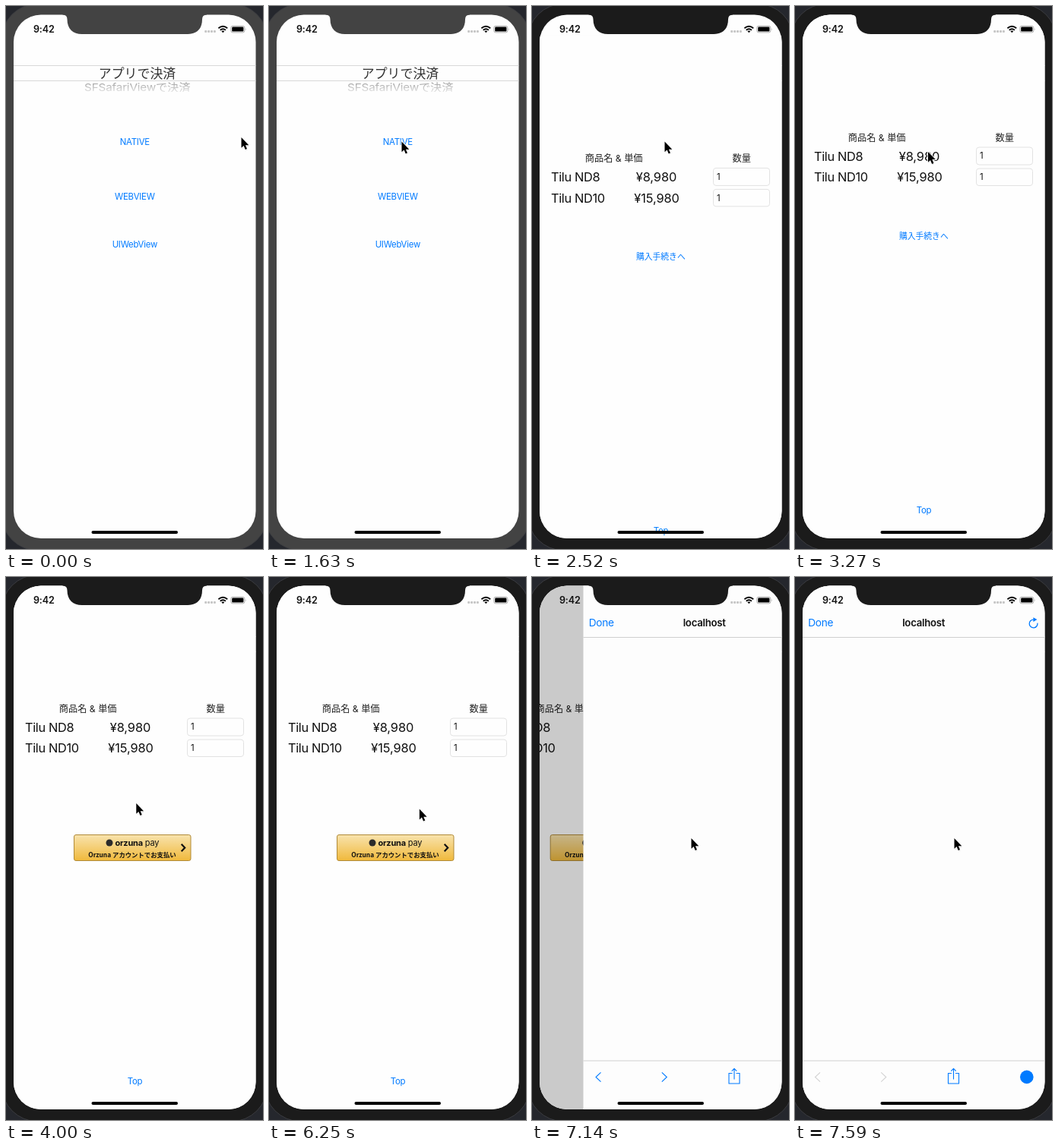
Write an HTML page that moves like this. It is 338 px wide and 715 px high and loops after 8000 ms.

```html
<!DOCTYPE html>
<html lang="ja">
<head>
<meta charset="utf-8">
<title>Checkout demo</title>
<style>
  html, body { margin: 0; width: 100%; height: 100%; overflow: hidden; background: #25272d; }
  svg { display: block; width: 338px; height: 715px; }
  text { font-family: Inter, "Noto Sans CJK JP", sans-serif; fill: #111; }
  .blue { fill: #007aff; }
  .mid { text-anchor: middle; }
  .link { font-size: 11.4px; letter-spacing: -.25px; }
  .head { font-size: 12.2px; fill: #222; }
  .item { font-size: 16.4px; letter-spacing: -.35px; }
  .price { font-size: 16.4px; letter-spacing: -.1px; }
  .line { fill: none; stroke: #007aff; stroke-width: 1.1; }
  .field { fill: #fefefe; stroke: #e2e2e2; stroke-width: 1; }
  .plain { font-family: "Noto Sans CJK JP", sans-serif; font-weight: 700; }
</style>
</head>
<body>
<svg viewBox="0 0 338 715" xmlns="http://www.w3.org/2000/svg">
  <defs>
    <clipPath id="screen"><rect x="10" y="11.5" width="318.5" height="689.5" rx="36"/></clipPath>
    <linearGradient id="gold" x2="0" y2="1">
      <stop offset="0" stop-color="#f8e3ad"/>
      <stop offset="1" stop-color="#f0b93c"/>
    </linearGradient>
    <linearGradient id="fade" x2="0" y2="1">
      <stop offset="0" stop-color="#fefefe" stop-opacity="0"/>
      <stop offset="1" stop-color="#fefefe" stop-opacity=".7"/>
    </linearGradient>
  </defs>

  <rect width="338" height="715" fill="#25272d"/>
  <rect id="body" x="-6" y="-3" width="350" height="720" rx="48" stroke="#3b3c40"/>

  <g clip-path="url(#screen)">
    <rect x="10" y="11" width="319" height="691" fill="#fefefe"/>

    <g id="menu">
      <text class="mid" x="172.5" y="94.8" font-size="16.9" style="fill:#333">アプリで決済</text>
      <text class="mid" transform="translate(172.7 112) scale(1 .88)" font-size="15.3" letter-spacing="-.2" style="fill:#a6a6a6">SFSafariViewで決済</text>
      <rect x="90" y="102" width="165" height="11" fill="url(#fade)"/>
      <rect x="90" y="113" width="165" height="8" fill="#fefefe"/>
      <path d="M10 78.5H329M10 98.5H329" stroke="#d8d8d8"/>
      <text class="mid blue link" x="169.3" y="182.9">NATIVE</text>
      <text class="mid blue link" x="169.3" y="254.6">WEBVIEW</text>
      <text class="mid blue link" x="169.3" y="318.4">UIWebView</text>
    </g>

    <g id="cart">
      <rect x="10" y="11" width="319" height="691" fill="#fefefe"/>
      <text class="mid head" x="107.7" y="177.6">商品名 &amp; 単価</text>
      <text class="mid head" x="275.7" y="177.6">数量</text>
      <text class="item" x="25" y="203.7">Tilu ND8</text>
      <text class="mid price" x="163.5" y="203.7">¥8,980</text>
      <rect class="field" x="238.5" y="186" width="74" height="23" rx="3.5"/>
      <text x="243" y="201.4" font-size="11.4">1</text>
      <text class="item" x="25" y="231.3">Tilu ND10</text>
      <text class="mid price" x="164" y="231.3">¥15,980</text>
      <rect class="field" x="238.5" y="214" width="74" height="22.5" rx="3.5"/>
      <text x="243" y="229.4" font-size="11.4">1</text>
      <text id="proceed" class="mid blue" x="169.3" y="306.6" font-size="10.8">購入手続きへ</text>
      <g id="pay">
        <rect x="89.5" y="339.5" width="153.5" height="34" rx="2.5" fill="url(#gold)" stroke="#b08a38"/>
        <circle cx="136" cy="350" r="4.5" fill="#2b2b2b"/>
        <text x="143.5" y="353.6" font-size="11" letter-spacing="-.2"><tspan font-weight="700">orzuna</tspan> pay</text>
        <text class="plain mid" x="166" y="369.4" font-size="8.4">Orzuna アカウントでお支払い</text>
        <path d="M230.7 351.8L235.2 356.5L230.7 361.2" fill="none" stroke="#111" stroke-width="2.2"/>
      </g>
      <text class="mid blue link" x="169.5" y="667.5">Top</text>
    </g>

    <rect id="dim" x="10" y="11" width="319" height="691"/>

    <g id="web">
      <rect x="10" y="11" width="319" height="691" fill="#fdfdfd"/>
      <path d="M10 79.5H329M10 637H329" stroke="#cfcfcf"/>
      <text class="blue" x="17.3" y="65.1" font-size="13.7" letter-spacing="-.3">Done</text>
      <text class="mid" x="169.2" y="64.8" font-size="13.2" font-weight="600" letter-spacing="-.25">localhost</text>
      <path class="line" style="stroke-width:1.3" d="M318.9 60.6A5.4 5.4 0 1 1 313.6 56.1"/>
      <path class="blue" d="M313.4 53.2L318.4 56.1L313.4 59Z"/>
      <path id="arrows" class="line" d="M33 652.3L26.5 658.5L33 664.7M113.3 652.3L119.8 658.5L113.3 664.7"/>
      <path class="line" d="M206 653.5H201.5V667H215.5V653.5H211M208.5 661.5V647.5M205.2 650.7L208.5 647.4L211.8 650.7"/>
      <circle class="blue" cx="304.8" cy="658.4" r="8.8"/>
    </g>

    <text class="mid" x="49.8" y="35.2" font-size="12.6" font-weight="600" letter-spacing="-.15">9:42</text>
    <g fill="#c6c6c6">
      <rect x="261.2" y="32" width="3" height="3" rx="1"/>
      <rect x="265.1" y="32" width="3" height="3" rx="1"/>
      <rect x="269" y="32" width="3" height="3" rx="1"/>
      <rect x="272.9" y="32" width="3" height="3" rx="1"/>
    </g>
    <g fill="none" stroke="#000" stroke-width="1.8">
      <path d="M279.4 29.2Q285.3 24.3 291.2 29.2"/>
      <path d="M281.7 31.7Q285.3 28.7 288.9 31.7"/>
    </g>
    <path d="M283.3 33.1Q285.3 31.7 287.3 33.1L285.3 35.2Z"/>
    <rect x="295.8" y="26.3" width="18" height="8.6" rx="2.3" fill="none" stroke="#a5a5a5" stroke-width=".9"/>
    <rect x="297.2" y="27.6" width="15.2" height="6" rx="1.2"/>
    <path d="M314.9 29.2Q316.4 30.6 314.9 32Z" fill="#a5a5a5"/>
    <rect x="112.5" y="690.9" width="113.5" height="4" rx="2"/>
  </g>

  <path id="notch" d="M74.5 10V11.5Q80.5 11.5 80.5 17.5C80.5 30 88 37 100 37H239C251 37 258 30 258 17.5Q258 11.5 264 11.5V10Z"/>

  <g id="cursor">
    <path d="M.5 1.5V15L3.6 12.2L5.7 17.2L8 16.2L6 11.4H10.2Z" fill="#000" opacity=".2"/>
    <path d="M0 0V13.8L3.1 11L5.2 16L7.5 15L5.4 10.2H9.8Z" stroke="#fff" stroke-width="1.8" paint-order="stroke"/>
  </g>
</svg>

<script>
const LOOP = 8000;
const WIDTH = 318.5, HEIGHT = 690;
const $ = id => document.getElementById(id);

// Screen refreshes: first, last, count
const bursts = [
  [750, 1630, 7], [2220, 2820, 5], [3270, 4000, 6],
  [6250, 7290, 8], [7440, 7590, 2]
];

const smooth = u => u * u * (3 - 2 * u);
const easeOut = u => 1 - (1 - u) * (1 - u);

const home = [309.5, 173];
const moves = [
  { from: 600, to: 1630, bend: [245, 164], end: [174.5, 178.5], ease: smooth },
  { from: 3120, to: 3850, bend: [177, 240], end: [171.3, 298], ease: smooth },
  { from: 6100, to: 6730, bend: [212, 297], end: [209.5, 344], ease: easeOut }
];

function snap(t) {
  let held = 0;
  for (const [first, last, count] of bursts) {
    if (t < first) break;
    const gap = (last - first) / (count - 1);
    held = first + gap * Math.min(count - 1, Math.floor((t - first + 6) / gap));
  }
  return held;
}

// Distance still to go in a critically damped spring, 1 to 0
function remain(ms) {
  if (ms <= 0) return 1;
  const x = ms * 0.01826;
  const r = (1 + x) * Math.exp(-x);
  return r < 0.001 ? 0 : r;
}

function pointer(t) {
  let pos = home;
  for (const m of moves) {
    if (t <= m.from) break;
    const p = m.ease(Math.min(1, (t - m.from) / (m.to - m.from))), q = 1 - p;
    pos = pos.map((a, i) => q * q * a + 2 * p * q * m.bend[i] + p * p * m.end[i]);
  }
  return pos;
}

const show = (id, on) => $(id).setAttribute("visibility", on ? "visible" : "hidden");
const shift = (id, x, y) => $(id).setAttribute("transform", `translate(${x.toFixed(2)} ${y.toFixed(2)})`);

function draw(time) {
  const t = snap(time);
  const rise = remain(t - 2245);
  const push = remain(t - 6970);
  const bezel = t < 2220 ? "#434343" : "#1b1b1b";

  $("body").setAttribute("fill", bezel);
  $("notch").setAttribute("fill", bezel);

  show("cart", rise < 1);
  shift("cart", -79.7 * (1 - push), HEIGHT * rise);
  const paid = t >= 3990;
  $("proceed").style.display = paid ? "none" : "";
  $("pay").style.display = paid ? "" : "none";

  $("dim").setAttribute("opacity", 0.25 * (1 - push));
  show("web", push < 1);
  shift("web", WIDTH * push, 0);
  $("arrows").style.stroke = t < 7440 ? "#007aff" : "#d2d2d2";

  shift("cursor", ...pointer(t));
}

let start;
function tick(now) {
  start ??= now;
  draw((now - start) % LOOP);
  requestAnimationFrame(tick);
}
draw(0);
requestAnimationFrame(tick);
</script>
</body>
</html>
```
